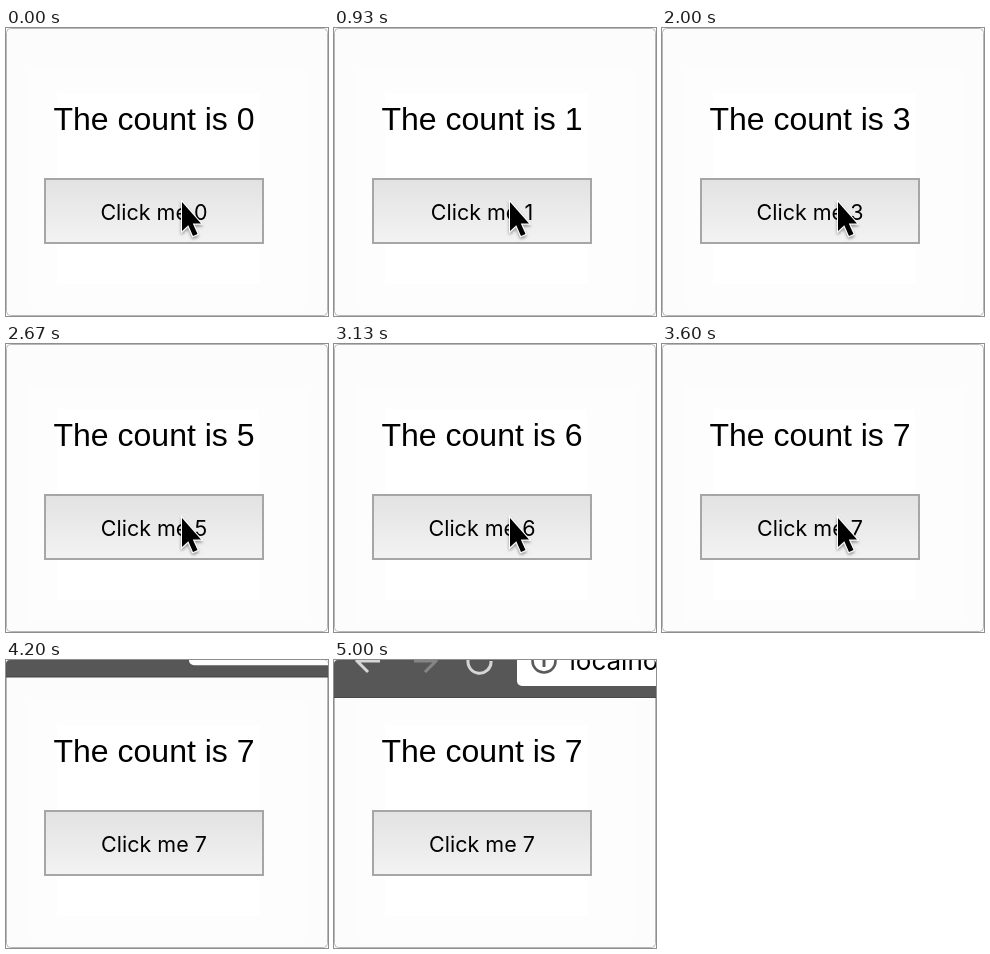
Write an HTML page that moves like this. It is 322x288 px and loops after 5390 ms.

```html
<!DOCTYPE html>
<html lang="en">
<head>
<meta charset="utf-8">
<title>Click counter</title>
<style>
  html, body { margin: 0; width: 100%; height: 100%; overflow: hidden; background: #fff; }
  svg { display: block; width: 322px; height: 288px; }
  .title { font: 32px "Liberation Sans", Arial, sans-serif; }
  .label { font: 21.5px Inter, sans-serif; text-anchor: middle; }
  .url { font: 26px Inter, sans-serif; }
</style>
</head>
<body>
<svg viewBox="0 0 322 288">
  <defs>
    <linearGradient id="face" x2="0" y2="1">
      <stop stop-color="#e2e2e2"/>
      <stop offset="1" stop-color="#f3f3f3"/>
    </linearGradient>
    <filter id="shadow" x="-50%" y="-30%" width="200%" height="170%">
      <feDropShadow dx="0" dy="2" stdDeviation="1.5" flood-opacity=".4"/>
    </filter>
    <clipPath id="window"><rect width="322" height="288" rx="4"/></clipPath>
  </defs>

  <g clip-path="url(#window)">
    <rect width="322" height="288" fill="#fcfcfc"/>
    <rect x="23" y="42" width="277" height="235" fill="#fdfdfd"/>
    <rect x="51" y="65" width="202" height="191" fill="#fff"/>
    <rect x=".5" y=".5" width="321" height="287" rx="4" fill="none" stroke="#b8b8b8"/>

    <text class="title" x="47.5" y="102">The count is <tspan id="count">0</tspan></text>
    <rect x="39" y="151" width="218" height="64" fill="url(#face)" stroke="#a6a6a6" stroke-width="2"/>
    <text class="label" x="148" y="192" id="label">Click me 0</text>

    <g id="toolbar">
      <rect width="322" height="38" fill="#575757"/>
      <rect y="37" width="322" height="1" fill="#484848"/>
      <g fill="none" stroke-width="3">
        <path d="M46 1H24M34 -10L23 1L34 12" stroke="#d6d6d6"/>
        <path d="M80 1H101M91 -10L102 1L91 12" stroke="#858585"/>
        <path d="M157 1A11.5 11.5 0 1 1 153 -7" stroke="#d6d6d6"/>
      </g>
      <rect x="183" y="-30" width="160" height="56" rx="5" fill="#fff"/>
      <circle cx="210" cy="1" r="11.5" fill="none" stroke="#5a5a5a" stroke-width="2.6"/>
      <path d="M210 -1V7M210 -6V-3" stroke="#5a5a5a" stroke-width="3"/>
      <text class="url" x="235.5" y="10">localhost</text>
    </g>
  </g>

  <g id="cursor" filter="url(#shadow)">
    <path d="M176 174V203L182.3 197.2L187 208L191.5 206L186.8 195.5H195Z"
          fill="#000" stroke="#fff" stroke-width="2" paint-order="stroke"/>
  </g>
</svg>

<script>
  const LOOP = 5390;
  const CLICKS = [930, 1330, 1800, 2200, 2670, 3000, 3600];
  const $ = id => document.getElementById(id);
  const move = (el, x, y) => el.setAttribute("transform", `translate(${x} ${y})`);
  const show = (el, on) => el.setAttribute("visibility", on ? "visible" : "hidden");
  const clamp = v => Math.min(1, Math.max(0, v));

  function render(t) {
    const count = CLICKS.filter(at => t >= at).length;
    $("count").textContent = count;
    $("label").textContent = `Click me ${count}`;

    // The pointer leaves up and to the right.
    const leaving = t >= 3930;
    move($("cursor"), leaving ? 68 : 0, leaving ? -36 : 0);
    show($("cursor"), t < 4000);

    // The toolbar slides in at 15 steps per second.
    const step = Math.floor((t + 5) * 0.015);
    const p = clamp((step - 62) / 3);
    show($("toolbar"), p > 0);
    move($("toolbar"), 0, -38 * (1 - p) ** 1.5);
  }

  const start = performance.now();
  function tick() {
    render((performance.now() - start) % LOOP);
    requestAnimationFrame(tick);
  }
  tick();
</script>
</body>
</html>
```
